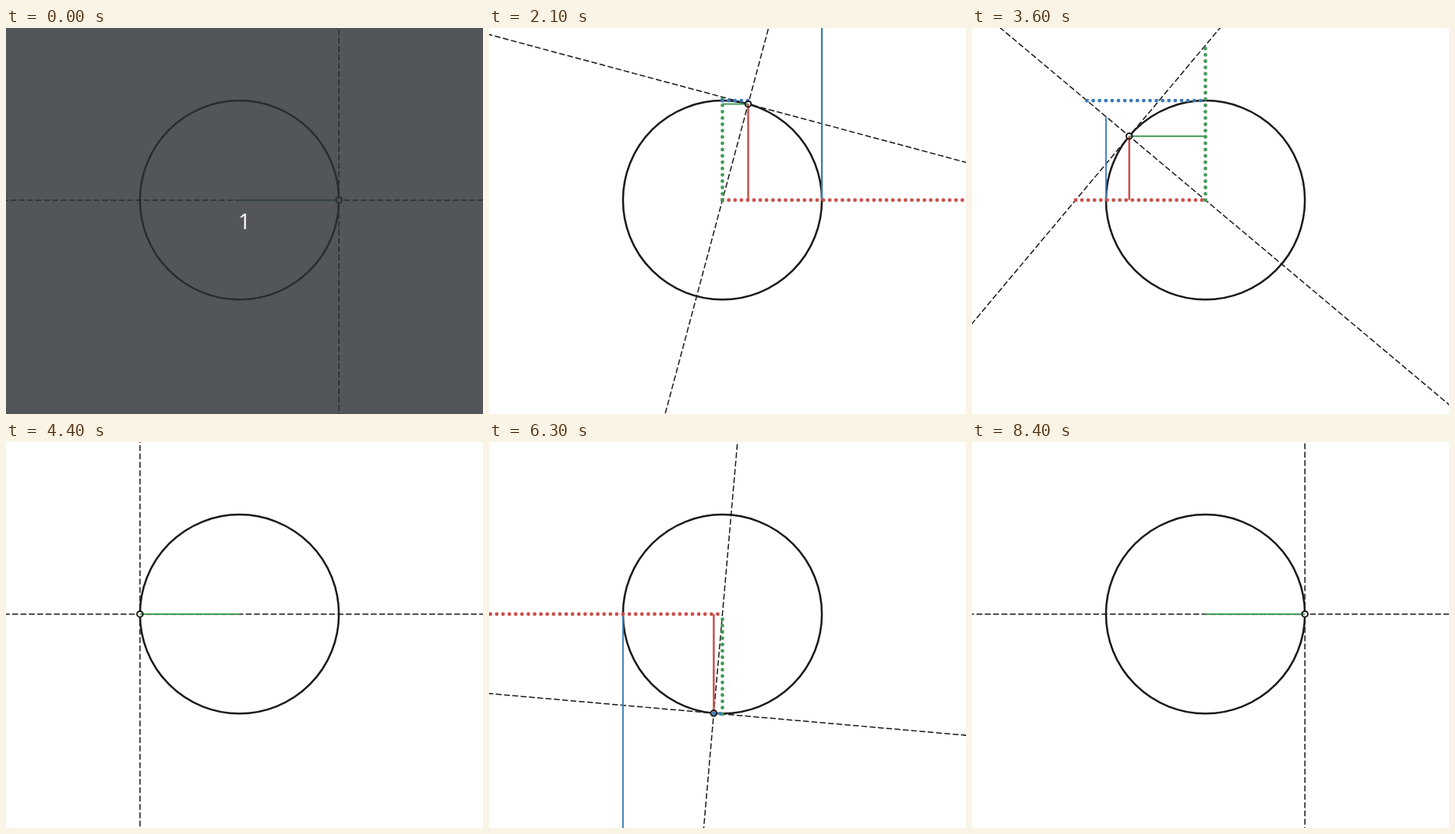
An HTML page with a canvas that plays this animation: 612 px wide and 495 px high, repeating every 8.6 s.

```html
<!DOCTYPE html>
<html lang="en">
<head>
<meta charset="utf-8">
<title>Trigonometric functions on the unit circle</title>
<style>
html, body { margin: 0; height: 100%; overflow: hidden; background: #fff; }
canvas { display: block; }
</style>
</head>
<body>
<canvas id="stage" width="612" height="495"></canvas>
<script>
const W = 612, H = 495, LOOP = 8600;
const CX = 299.5, CY = 220.7, R = 127.6, GAP = 8.1;
const INK = '#1a1a1a', RED = '#c9514b', GREEN = '#449a58', BLUE = '#3a7cbb';
const ctx = document.getElementById('stage').getContext('2d');

// Degrees: nine 5° steps per 45° turn, with a short rest after each turn.
function angleAt(t) {
  if (t < 600) return 0;
  if (t >= 7500) return Math.min(360, 320 + 5 * Math.max(0, Math.floor((t - 7600) / 100)));
  const s = t - 600;
  return 45 * Math.floor(s / 1000) + 5 * Math.min(9, Math.floor(s % 1000 / 100) + 1);
}

function line(x1, y1, x2, y2, color, width) {
  ctx.strokeStyle = color;
  ctx.lineWidth = width;
  ctx.beginPath();
  ctx.moveTo(x1, y1);
  ctx.lineTo(x2, y2);
  ctx.stroke();
}

function ring(x, y, r, width) {
  ctx.strokeStyle = INK;
  ctx.lineWidth = width;
  ctx.beginPath();
  ctx.arc(x, y, r, 0, 2 * Math.PI);
  ctx.stroke();
}

// Endless dashed line through a point.
function dashed(x, y, dx, dy) {
  ctx.setLineDash([7.5, 3.2]);
  line(x - dx * 1000, y - dy * 1000, x + dx * 1000, y + dy * 1000, INK, 1.5);
  ctx.setLineDash([]);
}

// Row of dots with a square first one.
function dots(x, y, dx, dy, length, color) {
  ctx.fillStyle = color;
  ctx.fillRect(x - 2.2, y - 2.2, 4.4, 4.4);
  ctx.beginPath();
  for (let d = GAP; d <= length; d += GAP) {
    const px = x + dx * d, py = y + dy * d;
    ctx.moveTo(px + 2.4, py);
    ctx.arc(px, py, 2.4, 0, 2 * Math.PI);
  }
  ctx.fill();
}

// Horizontal rows start at their left end, vertical ones at the bottom.
const dotsX = (y, len, color) => dots(CX + Math.min(0, len), y, 1, 0, Math.abs(len), color);
const dotsY = (x, len, color) => dots(x, CY + Math.max(0, len), 0, -1, Math.abs(len), color);

function drawFunctions(deg) {
  const a = deg * Math.PI / 180, c = Math.cos(a), s = -Math.sin(a);
  const x = CX + R * c, y = CY + R * s;
  const sx = Math.sign(c), sy = Math.sign(s), onAxis = deg % 90 === 0;

  ring(CX, CY, R, 2.5);
  dashed(CX, CY, c, s);
  dashed(x, y, -s, c);
  ctx.fillStyle = '#fff';
  ctx.beginPath();
  ctx.arc(x, y, 3.8, 0, 2 * Math.PI);
  ctx.fill();

  line(CX, y, x, y, GREEN, 1.9);
  line(x, CY, x, y, RED, 2.5);
  if (!onAxis) {
    const edge = CX + R * sx;
    line(edge, CY, edge, CY + R * s / Math.abs(c), BLUE, sx < 0 ? 1.9 : 2.3);
    dotsX(CY, R / c, RED);
    dotsY(CX, R / s, GREEN);
    dotsX(CY + R * sy, R * c / Math.abs(s), BLUE);
  }
  ring(x, y, 3.8, 2);
}

function drawCountdown() {
  ctx.fillStyle = 'rgba(45, 49, 56, 0.82)';
  ctx.fillRect(0, 0, W, H);
  ctx.fillStyle = '#fff';
  ctx.font = '28px "Open Sans", "Noto Sans", sans-serif';
  ctx.textAlign = 'center';
  ctx.fillText('1', W / 2, 258);
}

function frame(now) {
  const t = now % LOOP;
  ctx.fillStyle = '#fff';
  ctx.fillRect(0, 0, W, H);
  drawFunctions(angleAt(t));
  if (t < 100) drawCountdown();
  requestAnimationFrame(frame);
}

let start;
requestAnimationFrame(function begin(now) {
  start = now;
  const tick = time => frame(time);
  tick(0);
});
</script>
</body>
</html>
```
